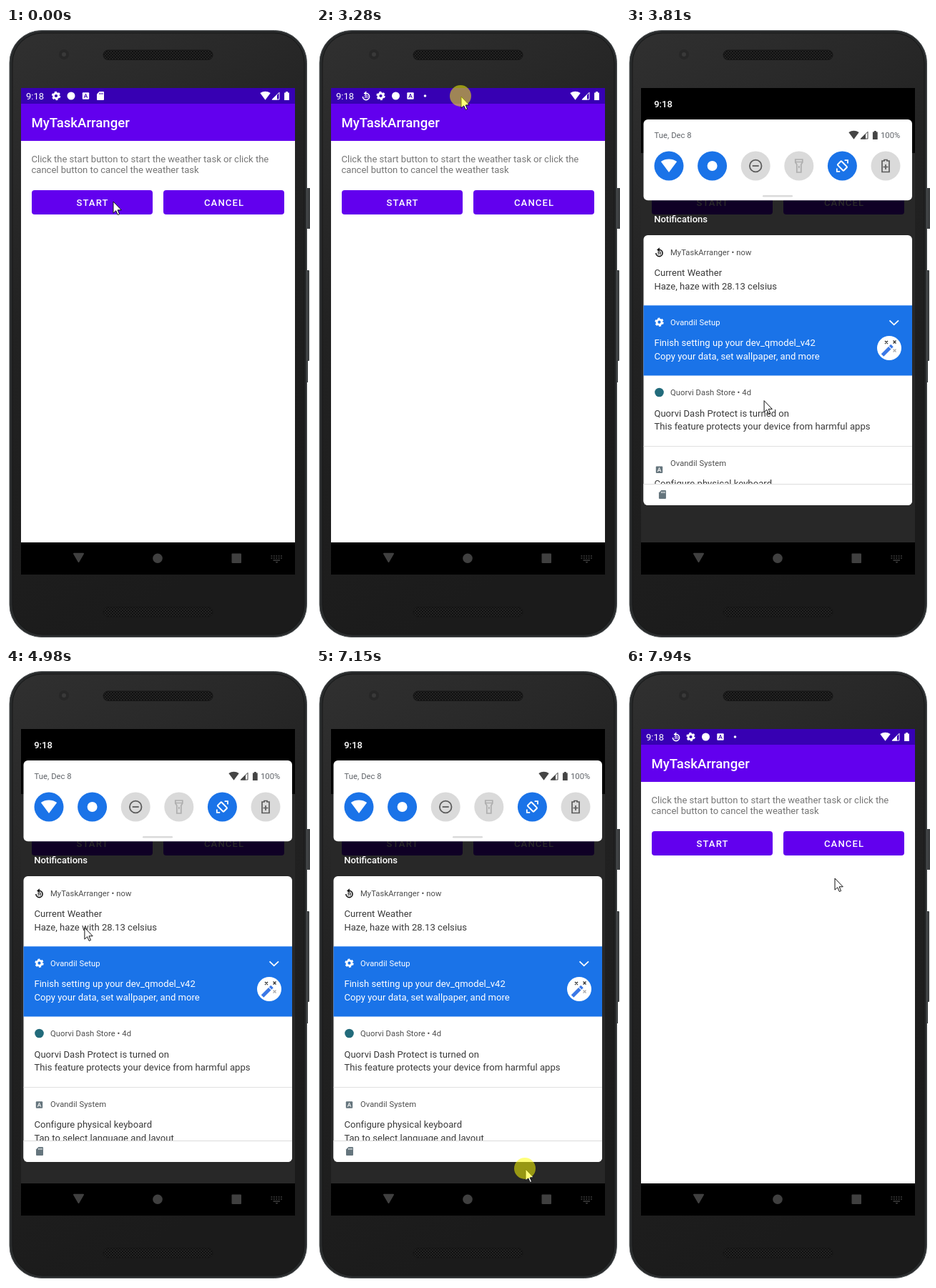
Write an HTML page that moves like this. It is 425 by 858 pixels and loops after 8000 ms.

```html
<!DOCTYPE html>
<html lang="en">
<head>
<meta charset="utf-8">
<title>Job service demo</title>
<style>
  html, body { margin: 0; width: 100%; height: 100%; overflow: hidden; background: #fff; }
  svg { display: block; width: 425px; height: 858px; }
  text { font: 13.04px Roboto, sans-serif; white-space: pre; }
  .med { font-weight: 500; }
  .title { font-size: 18.63px; font-weight: 500; }
  .note { letter-spacing: .04px; }
  .small { font-size: 11.2px; letter-spacing: .08px; }
  .btn { font-weight: 500; letter-spacing: 1.16px; text-anchor: middle; fill: #fff; }
  .line { fill: none; stroke: currentColor; }
</style>
</head>
<body>
<svg viewBox="0 0 425 858" xmlns="http://www.w3.org/2000/svg">
  <defs>
    <linearGradient id="bodyFill" x1="0" y1="0" x2=".3" y2="1">
      <stop offset="0" stop-color="#303030"/>
      <stop offset=".45" stop-color="#222"/>
      <stop offset="1" stop-color="#1b1b1b"/>
    </linearGradient>
    <pattern id="mesh" width="4" height="4" patternUnits="userSpaceOnUse">
      <rect width="4" height="4" fill="#232323"/>
      <circle cx="1" cy="1" r="1.1" fill="#0e0e0e"/>
      <circle cx="3" cy="3" r="1.1" fill="#0e0e0e"/>
    </pattern>
    <clipPath id="screenClip"><rect x="21" y="84" width="383" height="636"/></clipPath>
    <clipPath id="startClip"><rect x="36" y="227" width="169" height="34" rx="4"/></clipPath>
    <clipPath id="listClip"><rect id="listBox" x="24.5" y="290" width="375.5" height="400" rx="6"/></clipPath>

    <g id="gear" class="line">
      <circle r="3.5" stroke-width="2.8"/>
      <circle r="5.2" stroke-width="2" stroke-dasharray="2.9 2.545"/>
    </g>
    <g id="replay">
      <path class="line" stroke-width="1.6" d="M-4.6 1A4.6 4.6 0 1 0 0-3.6"/>
      <path fill="currentColor" d="M.3-6.8L-3.4-3.6 .3-.6Z"/>
      <text y="2.9" text-anchor="middle" fill="currentColor" style="font-size:5px;font-weight:700">30</text>
    </g>
    <g id="letter">
      <rect x="-4.7" y="-4.7" width="9.4" height="9.4" rx="1" fill="currentColor"/>
      <path class="line" d="M-2.3 2.8L0-2.8 2.3 2.8M-1.5 1H1.5" style="stroke:var(--ink)"/>
    </g>
    <g id="card">
      <path fill="currentColor" d="M-1.6-6H4q1 0 1 1V5q0 1-1 1H-4q-1 0-1-1V-2.6Z"/>
      <path class="line" d="M-1.2-4.3v2.3M.9-4.3v2.3M3-4.3v2.3" style="stroke:var(--ink)"/>
    </g>
    <path id="wifi" fill="currentColor" d="M0 5.8L-7.2-3.9A13 13 0 0 1 7.2-3.9Z"/>
    <g id="signal">
      <path class="line" d="M5-4.7V5H-4.7Z"/>
      <path fill="currentColor" d="M2-2V5.5H-5.5Z"/>
    </g>
    <path id="battery" fill="currentColor" d="M-1.5-6h3v1.4h1.9V6h-6.8V-4.6h1.9Z"/>
  </defs>

  <!-- phone body -->
  <rect x="419" y="224" width="6" height="57" fill="#3b3e40"/>
  <rect x="418" y="339" width="6" height="127" rx="1" fill="#3b3e40"/>
  <rect x="418" y="466" width="4" height="30" fill="#2b2d2e"/>
  <rect x="5" y="3.5" width="415.5" height="849" rx="45" fill="#292b2c" stroke="#4f5355"/>
  <rect x="9" y="7" width="408" height="842" rx="42" fill="url(#bodyFill)" stroke="#161717"/>
  <circle cx="81" cy="37" r="7" fill="#272727"/>
  <circle cx="81" cy="37" r="3" fill="#393939"/>
  <rect x="136" y="31" width="153" height="13.5" rx="6.7" fill="url(#mesh)" stroke="#161616"/>
  <rect x="136" y="810.5" width="153" height="13.5" rx="6.7" fill="url(#mesh)" stroke="#161616"/>

  <!-- navigation bar -->
  <rect x="21" y="720" width="383" height="45"/>
  <g fill="#404040">
    <path d="M95 735.8H108L101.5 747Z" stroke="#404040" stroke-width="2" stroke-linejoin="round"/>
    <circle cx="212" cy="742.3" r="6.8"/>
    <rect x="315.5" y="735.5" width="13.5" height="13.5" rx="1"/>
    <path d="M370.5 739H386M370.5 742H386" stroke="#404040" stroke-width="1.7" stroke-dasharray="1.8 1.6"/>
    <path d="M373.5 745H383" stroke="#404040" stroke-width="1.5"/>
    <path d="M376.5 747H380.5L378.5 749Z"/>
  </g>

  <g clip-path="url(#screenClip)">
    <!-- app -->
    <rect x="21" y="84" width="383" height="636" fill="#fff"/>
    <rect x="21" y="84" width="383" height="22" fill="#3700b3"/>
    <rect x="21" y="106" width="383" height="52" fill="#6200ee"/>
    <g color="#fff" fill="#fff" style="--ink:#3700b3">
      <text x="28" y="99.8">9:18</text>
      <use id="newIcon" href="#replay" x="70" y="95"/>
      <g id="icons">
        <use href="#gear" x="70" y="95"/>
        <circle cx="91" cy="95" r="5.5"/>
        <use href="#letter" x="111.5" y="95"/>
        <use id="sdIcon" href="#card" x="132" y="95"/>
      </g>
      <circle id="moreDot" cx="152.5" cy="95" r="1.8"/>
      <use href="#wifi" x="362.5" y="95"/>
      <use href="#signal" x="377" y="95"/>
      <use href="#battery" x="392.5" y="95"/>
      <text class="title" x="35.5" y="139.4">MyTaskArranger</text>
    </g>
    <g fill="#757575">
      <text x="35.5" y="187.6">Click the start button to start the weather task or click the</text>
      <text x="35.5" y="202.8">cancel button to cancel the weather task</text>
    </g>
    <g fill="#6200ee">
      <rect x="36" y="227" width="169" height="34" rx="4"/>
      <rect x="220" y="227" width="169" height="34" rx="4"/>
    </g>
    <g clip-path="url(#startClip)"><circle id="ripple" cx="153" cy="243" fill="#fff"/></g>
    <text class="btn" x="121.1" y="248.6">START</text>
    <text class="btn" x="305.1" y="248.6">CANCEL</text>
    <g id="toast">
      <rect x="133" y="652.5" width="158" height="45" rx="22.5" fill="#efefef"/>
      <text x="155.3" y="679.6" fill="#222">Job Service started</text>
    </g>

    <!-- notification shade -->
    <g id="shade">
      <rect id="scrim" x="21" y="84" width="383" height="636"/>
      <g id="shadeTop">
        <rect x="21" y="84" width="383" height="91"/>
        <text class="med" x="39.2" y="110.8" fill="#fff">9:18</text>
      </g>
      <g id="panels">
        <rect x="24.5" y="128" width="375.5" height="113.3" rx="6" fill="#fff"/>
        <rect x="191" y="234" width="42" height="2.4" rx="1.2" fill="#dadada"/>
        <g fill="#5f6368" color="#454545">
          <text class="small" x="39.5" y="154">Tue, Dec 8</text>
          <text class="small" x="356" y="154">100%</text>
          <use href="#wifi" x="318.5" y="150"/>
          <use href="#signal" x="333" y="150"/>
          <use href="#battery" x="348.3" y="150"/>
        </g>
        <g id="tiles"></g>
        <text class="med" x="39.2" y="272.2" fill="#fff">Notifications</text>
        <g clip-path="url(#listClip)">
          <rect x="24" y="290" width="377" height="440" fill="#fff"/>
          <rect x="24" y="388.3" width="377" height="98.2" fill="#1a73e8"/>
          <path d="M24 585.5H401" stroke="#e0e0e0"/>
          <g id="notes"></g>
          <use href="#replay" x="46.5" y="314" color="#111"/>
          <use href="#gear" x="46.5" y="411.7" color="#fff"/>
          <circle cx="46.5" cy="510" r="6.3" fill="#226b7b"/>
          <g id="sysIcon" color="#65757d" style="--ink:#fff"><use href="#letter" x="46.5" y="610"/></g>
          <path d="M368.5 409.3L374.7 415.3 381 409.3" fill="none" stroke="#fff" stroke-width="1.8"/>
          <circle cx="368" cy="448" r="17" fill="#fff"/>
          <path d="M358.5 458L372 444.5" stroke="#3b78e7" stroke-width="5"/>
          <path d="M367.3 445.3l3.8 3.8" stroke="#fff" stroke-width="1.2"/>
          <path d="M362 438l4 4m0-4l-4 4M373.5 437.5l4 4m0-4l-4 4" stroke="#333" stroke-width="1.3"/>
          <path d="M373.5 449.5l4 4m0-4l-4 4" stroke="#aaa" stroke-width="1.2"/>
          <g id="shelf" style="--ink:#fff">
            <rect x="24" y="660" width="377" height="31" fill="#fff"/>
            <path d="M24 660.5H401" stroke="#dcdcdc"/>
            <use id="shelfIcon" href="#card" y="675" color="#65757d"/>
          </g>
        </g>
      </g>
    </g>
  </g>

  <path id="cursor" d="M.5.5V16.7L4.2 13.2 6.8 19 9.1 18 6.6 12.3H11.8Z" fill="#fff" stroke="#111"/>
  <circle id="halo" r="15" fill="#ff0" fill-opacity=".52"/>
</svg>

<script>
const LOOP = 8000;
const $ = id => document.getElementById(id);

// quick-setting tiles: on/off and icon drawn around 0,0
const tiles = [
  [1, '<use href="#wifi" transform="scale(1.55)"/>'],
  [1, '<circle r="7" fill="currentColor"/>'],
  [0, '<circle class="line" r="8.3" stroke-width="1.8"/><path class="line" stroke-width="1.8" d="M-4.5 0H4.5"/>'],
  [0, '<path class="line" opacity=".35" stroke-width="1.7" d="M-5-9H5V-5L3-2V9H-3V-2L-5-5ZM-5-5.5H5M0 0V3"/>'],
  [1, '<rect class="line" x="-3.8" y="-6" width="7.6" height="12" rx="1" stroke-width="2" transform="rotate(-45)"/>' +
      '<path class="line" stroke-width="1.8" d="M3.2-7.8H7.6V-3.4M-3.2 7.8H-7.6V3.4"/>'],
  [0, '<path class="line" stroke-width="1.7" d="M-2-8.5H2V-7H5V8.5H-5V-7H-2ZM0-2V5M-3.5 1.5H3.5"/>']
];
$('tiles').innerHTML = tiles.map(([on, icon], i) =>
  `<g transform="translate(${60 + i * 60.6} 193)" color="${on ? '#fff' : '#5c5c5c'}">
    <circle r="20.5" fill="${on ? '#1a73e8' : '#dadada'}"/>${icon}</g>`).join('');

const notes = [
  ['MyTaskArranger • now', 'Current Weather', 'Haze, haze with 28.13 celsius'],
  ['Ovandil Setup', 'Finish setting up your dev_qmodel_v42', 'Copy your data, set wallpaper, and more'],
  ['Quorvi Dash Store • 4d', 'Quorvi Dash Protect is turned on', 'This feature protects your device from harmful apps'],
  ['Ovandil System', 'Configure physical keyboard', 'Tap to select language and layout']
];
$('notes').innerHTML = notes.map(([app, head, body], i) => {
  const y = 317.6 + i * 98.4, blue = i === 1;
  return `<g fill="${blue ? '#fff' : '#3a3a3a'}">
    <text class="small" x="62" y="${y}" fill="${blue ? '#fff' : '#4c4c4c'}">${app}</text>
    <text class="note" x="39.4" y="${y + 29.3}">${head}</text>
    <text class="note" x="39.4" y="${y + 47.9}">${body}</text></g>`;
}).join('');

// rows of [time, value, ...]
const pointer = [
  [0, 150, 243], [40, 150, 243], [80, 153, 243], [2260, 153, 243], [2480, 204, 92],
  [2800, 204, 92], [2960, 202, 95], [3110, 203, 96], [3380, 203, 96],
  [3720, 193, 545], [3810, 193, 522], [4200, 228, 361], [4270, 228, 351],
  [4530, 228, 351], [4980, 110, 362], [5130, 94, 362], [5360, 104, 360],
  [5900, 243, 345], [6230, 174, 329], [6540, 305, 700], [6850, 305, 700],
  [6960, 303, 707], [7070, 293, 700], [7330, 293, 700], [7700, 284, 432],
  [7800, 284, 432], [7940, 292, 293]
];
const shadeEdge = [
  [3370, 84], [3430, 150], [3730, 610], [3810, 668], [3950, 685], [4200, 690],
  [7330, 690], [7400, 640], [7640, 190], [7700, 84]
];
const toastFade = [[1000, 0], [1410, 1], [2800, 1], [2970, 0]];
const iconShift = [[1660, 0], [1950, 1]];
const rippleSize = [[540, 8], [800, 150]];
const rippleFade = [[540, 0], [560, .24], [760, .24], [1050, 0]];
const presses = [[560, 720], [3280, 3740], [7150, 7660]];

function at(rows, t) {
  const i = rows.findIndex(r => r[0] > t);
  if (i === 0) return rows[0].slice(1);
  if (i < 0) return rows[rows.length - 1].slice(1);
  const a = rows[i - 1], b = rows[i], k = (t - a[0]) / (b[0] - a[0]);
  return a.slice(1).map((v, n) => v + (b[n + 1] - v) * k);
}
const set = (id, attrs) => {
  for (const k in attrs) $(id).setAttribute(k, attrs[k]);
};

function drawShade(edge) {
  const open = (edge - 84) / 606;
  set('shade', { visibility: open > 0 ? 'visible' : 'hidden' });
  const slide = -157 * (1 - Math.min(1, open * 1.5));
  const gap = 690 - edge;
  set('scrim', { opacity: .845 * Math.min(1, open * 1.5) });
  set('shadeTop', { opacity: Math.min(1, open * 2) });
  set('panels', { transform: `translate(0 ${slide})` });
  set('listBox', { height: Math.max(0, edge - slide - 290) });
  set('shelf', { transform: `translate(0 ${-gap - slide})` });
  set('shelfIcon', { x: 47 + Math.min(4, gap * .18) });
  set('sysIcon', { transform: `translate(0 ${Math.min(9, gap * .38)})` });
}

function draw(t) {
  const [x, y] = at(pointer, t);
  set('cursor', { transform: `translate(${x - .5} ${y - .5})` });
  const down = presses.some(([a, b]) => t >= a && t < b);
  set('halo', { cx: x - 1, cy: y - 1, visibility: down ? 'visible' : 'hidden' });

  set('ripple', { r: at(rippleSize, t)[0], opacity: at(rippleFade, t)[0] });
  set('toast', { opacity: at(toastFade, t)[0] });

  const [shift] = at(iconShift, t);
  set('icons', { transform: `translate(${shift * 20.5} 0)` });
  set('newIcon', { opacity: shift });
  set('sdIcon', { opacity: 1 - shift });
  set('moreDot', { opacity: shift });

  drawShade(at(shadeEdge, t)[0]);
}

const start = performance.now();
function frame(now) {
  draw(Math.max(0, now - start) % LOOP);
  requestAnimationFrame(frame);
}
draw(0);
requestAnimationFrame(frame);
</script>
</body>
</html>
```
